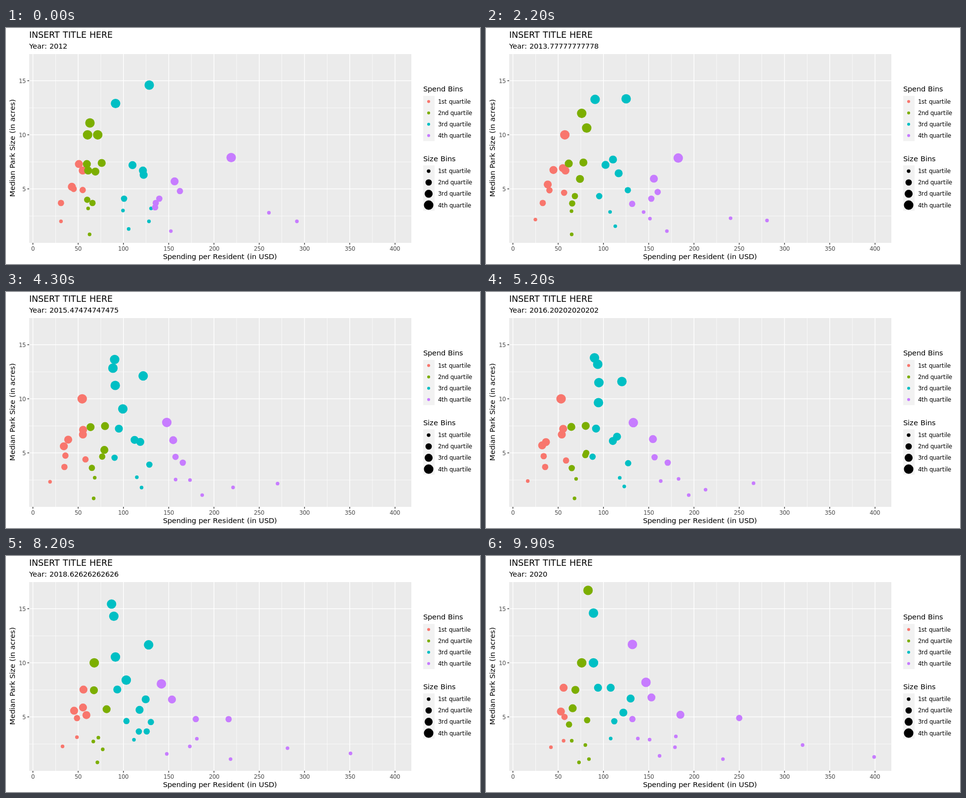
An HTML page with a canvas that plays this animation: 960x480 px, repeating every 10000 ms.

```html
<!DOCTYPE html>
<html lang="en">
<head>
<meta charset="utf-8">
<title>Park size and spending</title>
<style>
html, body { margin: 0; height: 100%; overflow: hidden; background: #fff }
canvas { display: block }
</style>
</head>
<body>
<canvas id="stage" width="960" height="480"></canvas>
<script>
const ctx = document.getElementById('stage').getContext('2d');
const colors = ['#F8766D', '#7CAE00', '#00BFC4', '#C77CFF'];
const radii = [3.7, 6.4, 8.1, 9.6];
const labels = ['1st quartile', '2nd quartile', '3rd quartile', '4th quartile'];

// Colour follows the spending quartile, radius the size quartile
const bin = (value, limits) => limits.filter(limit => value > limit).length;
const colorOf = usd => colors[bin(usd, [59.5, 85.5, 131])];
const radiusOf = acres => radii[bin(acres, [3.25, 5.1, 7.75])];

const STEPS = 100, TURN = 52, LAST = STEPS - 1;
const mix = (a, b, k) => a + (b - a) * k;
const cities = [];

// A city drifts from its first to its last [spending, acres], by way of one turning point
function city(start, turn, end) {
  cities.push(step => {
    if (!end) return start.map((v, i) => mix(v, turn[i], step / LAST));
    return step < TURN
      ? start.map((v, i) => mix(v, turn[i], step / TURN))
      : turn.map((v, i) => mix(v, end[i], (step - TURN) / (LAST - TURN)));
  });
}

// Small parks
city([31, 2], [16.4, 2.4], [42, 2.2]);
city([61, 3.2], [69.8, 2.6], [65, 2.8]);
city([62.6, .8], [73, .8]);
city([99.5, 3], [118, 2.7], [108, 3]);
city([130.5, 3.2], [163.3, 2.4], [179, 2.2]);
city([128.2, 2], [183, 2.6], [180, 3.2]);
city([105.8, 1.3], [123, 1.9], [162, 1.4]);
city([152.4, 1.1], [232, 1.1]);
city([260.7, 2.8], [212.8, 1.6], [320, 2.4]);
city([291.6, 2], [265.8, 2.2], [399, 1.3]);

// Medium parks
city([31, 3.7], [35.6, 3.7], [56, 2.8]);
city([45, 5], [34, 4.7], [57, 5]);
city([55, 4.9], [58.7, 4.3], [80, 2.4]);
city([60, 4], [80, 4.8], [138, 3]);
city([65.8, 3.7], [65, 3.6], [84, 1.1]);
city([100.7, 4.1], [88, 4.65], [112, 4.6]);
city([135, 3.3], [127.3, 4.05], [132, 4.8]);
city([139.6, 4.1], [171, 4.1], [185, 5.2]);
city([162.4, 4.8], [156.5, 4.6], [250, 4.9]);
city([135.7, 3.7], [115, 6.5], [130, 6.7]);

// Large parks
city([43, 5.2], [32.3, 5.7], [53, 5.5]);
city([50.8, 7.3], [36.5, 6], [66, 5.8]);
city([55, 6.7], [56, 7.7]);
city([59.6, 7.3], [69, 7.5]);
city([61, 6.7], [54, 6.7], [62, 4.3]);
city([69, 6.6], [81, 5], [151, 2.9]);
city([76, 7.4], [80.4, 7.5], [82, 4.7]);
city([110, 7.2], [91.8, 7.25], [94, 7.7]);
city([121.5, 6.7], [110.4, 6.1], [122, 5.4]);
city([122.3, 6.3], [94.5, 9.65], [108, 7.7]);
city([156.5, 5.7], [153, 6.8]);

// Largest parks
city([63, 11.1], [93.7, 13.2], [83, 16.7]);
city([60.4, 10], [53.2, 10], [76, 10]);
city([71.6, 10], [95, 11.5], [89, 10]);
city([91.3, 12.9], [89, 14.6]);
city([128.5, 14.6], [120.4, 11.6], [132, 11.7]);
city([219, 7.9], [133, 7.8], [147, 8.2]);

const px = usd => 54.5 + usd * 1.8335;
const py = acres => 437.3 - acres * 22;

function rect(x, y, w, h, color) {
  ctx.fillStyle = color;
  ctx.fillRect(x, y, w, h);
}

function circle(x, y, r, color) {
  ctx.fillStyle = color;
  ctx.beginPath();
  ctx.arc(x, y, r, 0, 2 * Math.PI);
  ctx.fill();
}

// Letters advance by whole pixels; align is 0 for left, .5 for centre, 1 for right
function text(str, x, y, size, align = 0, color = '#000') {
  ctx.font = size + 'px "DejaVu Sans", sans-serif';
  ctx.fillStyle = color;
  const width = s => ctx.measureText(s).width;
  const chars = [...String(str)];
  const advances = chars.map((c, i) => {
    const next = chars[i + 1] || '';
    return Math.round(width(c + next) - width(next));
  });
  x = Math.round(x - align * advances.reduce((a, b) => a + b));
  chars.forEach((c, i) => {
    ctx.fillText(c, x, Math.round(y));
    x += advances[i];
  });
}

const SMALL = 11.73, NORMAL = 14.67, LARGE = 17.6;
const vLine = (x, w) => rect(x - w / 2, 53, w, 384, '#fff');
const hLine = (y, w) => rect(47, y - w / 2, 774, w, '#fff');

function axes() {
  rect(47, 53, 774, 384, '#EBEBEB');
  for (let u = 25; u < 400; u += 50) vLine(px(u), .71);
  for (let a = 2.5; a < 15; a += 5) hLine(py(a), .71);
  for (let u = 0; u <= 400; u += 50) {
    vLine(px(u), 1.42);
    rect(px(u) - .71, 437, 1.42, 3.67, '#333');
    text(u, px(u), 453, SMALL, .5, '#4D4D4D');
  }
  for (let a = 5; a <= 15; a += 5) {
    hLine(py(a), 1.42);
    rect(43.3, py(a) - .71, 3.67, 1.42, '#333');
    text(a, 40.3, py(a) + 4.3, SMALL, 1, '#4D4D4D');
  }
  text('Spending per Resident (in USD)', 433.5, 470, NORMAL, .5);
  ctx.save();
  ctx.translate(18, 244.5);
  ctx.rotate(-Math.PI / 2);
  text('Median Park Size (in acres)', 0, 0, NORMAL, .5);
  ctx.restore();
}

function legend(title, top, radius, color) {
  text(title, 845, top - 9, NORMAL);
  rect(845, top, 23, 92.2, '#F2F2F2');
  labels.forEach((label, i) => {
    const y = top + 11.6 + i * 23.04;
    circle(856, y, radius(i), color(i));
    text(label, 875, y + 4.3, SMALL);
  });
}

function draw(now) {
  const step = Math.floor(now / 100) % STEPS;
  rect(0, 0, 960, 480, '#fff');
  text('INSERT TITLE HERE', 47, 20, LARGE);
  text('Year: ' + Number((2012 + 8 * step / LAST).toPrecision(15)), 47, 42, NORMAL);
  axes();
  legend('Spend Bins', 138, () => 3, i => colors[i]);
  legend('Size Bins', 279.5, i => radii[i], () => '#000');
  for (const at of cities) {
    const [usd, acres] = at(step);
    circle(px(usd), py(acres), radiusOf(acres), colorOf(usd));
  }
  requestAnimationFrame(draw);
}
requestAnimationFrame(draw);
</script>
</body>
</html>
```
